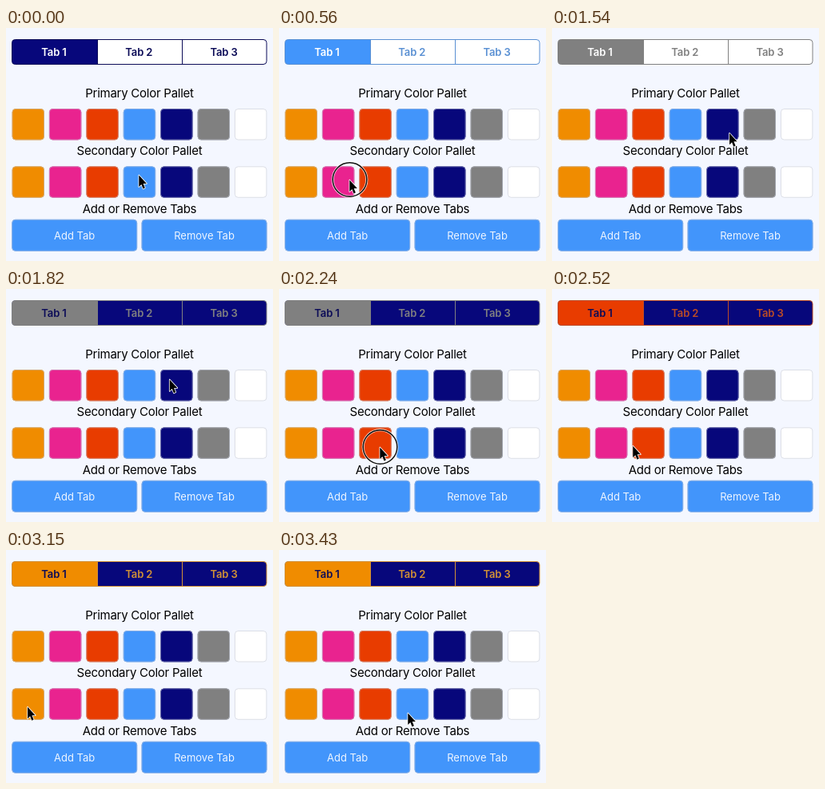
Recreate the animation shown at these times as an HTML page with a canvas. Size 334 px wide and 292 px high, loop 3500 ms.

```html
<!DOCTYPE html>
<html lang="en">
<head>
<meta charset="utf-8">
<title>Tab colors</title>
<style>
  html, body { margin: 0; width: 100%; height: 100%; overflow: hidden; background: #f4f7ff; }
  canvas { display: block; width: 334px; height: 292px; }
</style>
</head>
<body>
<canvas id="stage"></canvas>
<script>
const W = 334, H = 292, LOOP = 3500, STEP = 70;
const LEFT = 8, PITCH = 46.4, ROW_1 = 101.5, ROW_2 = 173.8;
const canvas = document.getElementById('stage');
const ctx = canvas.getContext('2d');
const dpr = window.devicePixelRatio || 1;
canvas.width = W * dpr;
canvas.height = H * dpr;

const orange = '#f08c00', pink = '#e9238f', red = '#e83c00', blue = '#4295fb',
  navy = '#07077b', gray = '#808080', white = '#ffffff';
const swatches = [orange, pink, red, blue, navy, gray, white];

// Every click picks the swatch below the pointer
const clicks = [
  { at: 140, x: 166, y: 184 },
  { at: 560, x: 88, y: 190 },
  { at: 910, x: 127.5, y: 187 },
  { at: 1225, x: 258, y: 198 },
  { at: 1645, x: 209, y: 108 },
  { at: 2240, x: 126, y: 198 },
  { at: 2660, x: 83, y: 195 },
  { at: 3010, x: 22, y: 196 }
];
const stops = [...clicks, { at: 3430, x: 161, y: 204 }];
const HOLD = 105, REACT = 70;

function pointerAt(t) {
  const i = stops.findIndex(s => s.at > t);
  if (i < 0) return stops[stops.length - 1];
  if (i === 0) return stops[0];
  const a = stops[i - 1], b = stops[i], leave = a.at + HOLD;
  const u = Math.max(0, (t - leave) / (b.at - leave));
  const e = u * u * (3 - 2 * u);
  return { x: a.x + (b.x - a.x) * e, y: a.y + (b.y - a.y) * e };
}

function themeAt(t) {
  const theme = { primary: white, secondary: navy };
  for (const { at, x, y } of clicks) {
    if (t < at + REACT) break;
    theme[y < ROW_2 ? 'primary' : 'secondary'] = swatches[Math.floor((x - LEFT) / PITCH)];
  }
  return theme;
}

// Thin strokes and letters look a little less saturated than fills
function ink(hex, keep = 0.65) {
  const rgb = [1, 3, 5].map(i => parseInt(hex.slice(i, i + 2), 16));
  const luma = 0.3 * rgb[0] + 0.59 * rgb[1] + 0.11 * rgb[2];
  return `rgb(${rgb.map(v => Math.round(luma + (v - luma) * keep))})`;
}

function box(x, y, w, h, r, fill, stroke) {
  ctx.beginPath();
  ctx.roundRect(x, y, w, h, r);
  if (fill) { ctx.fillStyle = fill; ctx.fill(); }
  if (stroke) { ctx.strokeStyle = stroke; ctx.lineWidth = 1; ctx.stroke(); }
}

// Filled box with a pale edge blended over its own colour
function softBox(x, y, w, h, color) {
  box(x, y, w, h, 4, color, color);
  box(x, y, w, h, 4, null, 'rgba(190,195,210,.55)');
}

function label(text, x, y, size, color, weight = 400, spacing = 0) {
  ctx.font = `${weight} ${size}px Inter, "Liberation Sans", sans-serif`;
  ctx.letterSpacing = spacing + 'px';
  ctx.fillStyle = color;
  ctx.textAlign = 'center';
  ctx.fillText(text, x, y);
}

function drawTabs({ primary, secondary }) {
  const line = ink(secondary);
  box(7.5, 14.5, 318.5, 31, 4, primary);
  box(7.5, 14.5, 107, 31, [4, 0, 0, 4], secondary);
  ctx.fillStyle = line;
  ctx.fillRect(114, 14.5, 1, 31);
  ctx.fillRect(220, 14.5, 1, 31);
  box(7.5, 14.5, 318.5, 31, 4, null, line);
  for (let i = 0; i < 3; i++) {
    label('Tab ' + (i + 1), 60 + i * 106.3, 35, 13, i ? line : ink(primary), 600, -0.1);
  }
}

function drawRow(title, y) {
  label(title, 167, y - 14.7, 15, '#000', 400, -0.25);
  swatches.forEach((color, i) => softBox(LEFT + i * PITCH, y, 39.5, 38.5, color));
}

function drawButton(text, x) {
  softBox(x, 240.3, 156, 39, blue);
  label(text, x + 78, 265, 13, '#eef5ff');
}

function drawRing(x, y) {
  ctx.beginPath();
  ctx.arc(x + 0.5, y, 21.3, 0, Math.PI * 2);
  ctx.strokeStyle = 'rgba(255,255,255,.75)';
  ctx.lineWidth = 3.2;
  ctx.stroke();
  ctx.strokeStyle = '#111';
  ctx.lineWidth = 1.5;
  ctx.stroke();
}

const arrow = new Path2D('M0 0V15.2L3.5 12L6 17.8L8.7 16.6L6.2 11H11Z');

function drawPointer(x, y) {
  ctx.save();
  ctx.translate(x + 0.3, y + 0.5);
  ctx.scale(0.87, 0.95);
  ctx.lineJoin = 'round';
  ctx.strokeStyle = '#fff';
  ctx.lineWidth = 1.8;
  ctx.stroke(arrow);
  ctx.fillStyle = '#000';
  ctx.fill(arrow);
  ctx.restore();
}

function draw(t) {
  ctx.setTransform(dpr, 0, 0, dpr, 0, 0);
  ctx.fillStyle = '#f4f7ff';
  ctx.fillRect(0, 0, W, H);
  drawTabs(themeAt(t));
  drawRow('Primary Color Pallet', ROW_1);
  drawRow('Secondary Color Pallet', ROW_2);
  label('Add or Remove Tabs', 167, 231.5, 15, '#000', 400, -0.25);
  drawButton('Add Tab', 7.7);
  drawButton('Remove Tab', 170);
  const { x, y } = pointerAt(t);
  if (clicks.some(c => t >= c.at - 35 && t < c.at + REACT)) drawRing(x, y);
  drawPointer(x, y);
}

const start = performance.now();
function frame() {
  const t = (performance.now() - start) % LOOP;
  draw(Math.floor(t / STEP) * STEP);
  requestAnimationFrame(frame);
}
frame();
</script>
</body>
</html>
```
